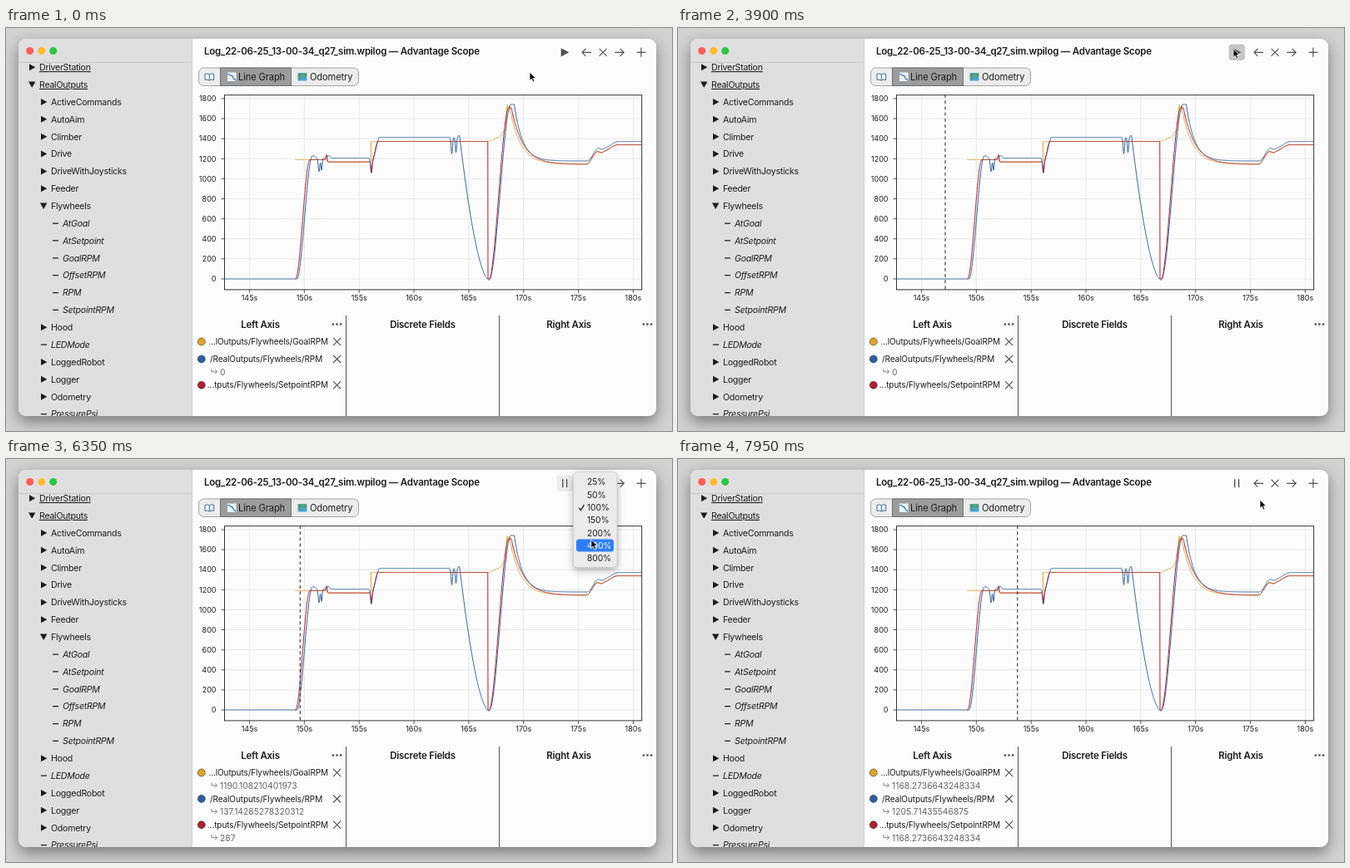
These frames come from a looping animation (800 by 485 pixels, 8000 ms). An HTML page:

```html
<!DOCTYPE html>
<html lang="en">
<head>
<meta charset="utf-8">
<title>Log viewer</title>
<style>
html, body { margin: 0; width: 100%; height: 100%; overflow: hidden; background: #d2d2d2; }
svg { display: block; width: 800px; height: 485px; }
text { font-family: Inter, sans-serif; letter-spacing: -.01em; white-space: pre; }
.tree text { letter-spacing: -.025em; }
.bold { font-weight: 600; letter-spacing: -.02em; }
.axis { letter-spacing: 0; }
.window { filter: drop-shadow(0 7px 9px rgba(0,0,0,.42)); }
.menu { filter: drop-shadow(0 3px 4px rgba(0,0,0,.3)); }
</style>
</head>
<body>
<script>
const NS = 'http://www.w3.org/2000/svg';
const INK = '#1c1c1c', ICON = '#505050', GOLD = '#dfa42c', BLUE = '#2f5f99', RED = '#a8232f';

function add(parent, tag, attrs = {}, content) {
  const el = document.createElementNS(NS, tag);
  for (const key in attrs) el.setAttribute(key, attrs[key]);
  if (content !== undefined) el.textContent = content;
  parent.append(el);
  return el;
}
const group = (parent, attrs) => add(parent, 'g', attrs);
const rect = (parent, x, y, width, height, fill, more) => add(parent, 'rect', { x, y, width, height, fill, ...more });
const path = (parent, d, stroke, more) => add(parent, 'path', { d, stroke, fill: 'none', ...more });
const shape = (parent, d, fill) => add(parent, 'path', { d, fill });
const dot = (parent, cx, cy, r, fill) => add(parent, 'circle', { cx, cy, r, fill });
// y is the visual middle of the line of text
const label = (parent, x, y, size, content, more) =>
  add(parent, 'text', { x, y: y + size * .363, 'font-size': size, fill: INK, ...more }, content);
const show = (el, on) => el.setAttribute('visibility', on ? 'visible' : 'hidden');
const place = (el, x, y) => el.setAttribute('transform', `translate(${x} ${y})`);

// Smooth 0..1 between two positions, and a soft spike around one
const ease = (x, from, to) => {
  const u = Math.min(1, Math.max(0, (x - from) / (to - from)));
  return u * u * (3 - 2 * u);
};
const bump = (x, centre, width) => Math.exp(-(((x - centre) / width) ** 2));

const svg = add(document.body, 'svg', { viewBox: '0 0 800 485', width: 800, height: 485 });
const defs = add(svg, 'defs');
const clip = (id, x, y, w, h, rx = 0) => rect(add(defs, 'clipPath', { id }), x, y, w, h, '#000', { rx });
clip('frame', 15, 13, 766, 454, 9);
clip('tree', 15, 41, 209, 426);
clip('plot', 262, 80, 502, 235);

rect(svg, 15, 13, 766, 454, '#fcfcfd', { rx: 9, class: 'window' });
const app = group(svg, { 'clip-path': 'url(#frame)' });

// Sidebar
rect(app, 15, 13, 209, 454, '#e0dfe0');
path(app, 'M223.5 13V467', '#d0d0d0');
path(app, 'M15 41.5H223', '#c9c9c9');
['#fe5f57', '#febc2e', '#28c840'].forEach((c, i) => dot(app, 28.7 + i * 14, 27.5, 4.5, c));

const tree = group(app, { 'clip-path': 'url(#tree)', class: 'tree' });
// + closed, v open, - field; the digit is the depth
const entries = ['+0DriverStation', 'v0RealOutputs', '+1ActiveCommands', '+1AutoAim', '+1Climber', '+1Drive',
  '+1DriveWithJoysticks', '+1Feeder', 'v1Flywheels', '-2AtGoal', '-2AtSetpoint', '-2GoalRPM', '-2OffsetRPM',
  '-2RPM', '-2SetpointRPM', '+1Hood', '-1LEDMode', '+1LoggedRobot', '+1Logger', '+1Odometry', '-1PressurePsi'];
const markers = { '+': 'M-12-4l7.3 4l-7.3 4z', 'v': 'M-13-3.6h8.4l-4.2 7.4z', '-': 'M-12-.6h7v1.3h-7z' };
entries.forEach(([kind, depth, ...name], i) => {
  const row = group(tree);
  place(row, 40 + depth * 14, 47.2 + i * 20.87);
  shape(row, markers[kind], INK);
  label(row, 0, 0, 10.6, name.join(''), {
    'font-style': kind === '-' ? 'italic' : 'normal',
    'text-decoration': depth === '0' ? 'underline' : 'none'
  });
});

// Title and tabs
label(app, 238, 27.7, 11.5, 'Log_22-06-25_13-00-34_q27_sim.wpilog — Advantage Scope', { class: 'bold' });
rect(app, 231.5, 48, 192, 21.5, '#ececec', { rx: 6, stroke: '#a3a3a3' });
rect(app, 257.5, 48, 85, 21.5, '#9c9c9c', { stroke: '#6f6f6f' });
label(app, 279, 59, 11.1, 'Line Graph');
label(app, 365, 59, 11.1, 'Odometry');
path(app, 'M239 55.5q3-1.5 5.3 .4q2.3-1.9 5.3-.4v7q-3-1.2-5.3 .6q-2.3-1.8-5.3-.6zM244.3 56v7', '#3d6f9c', { fill: '#f6f6f6' });
rect(app, 266, 53.5, 10.5, 10.5, '#edf3f9');
path(app, 'M266.5 55l3 2.2l2 .2l2.4 4l2.3 1.6', '#2878bd', { 'stroke-width': 1.3 });
rect(app, 350.5, 54, 11, 9.5, '#48a5cf', { rx: .8 });
shape(app, 'M351 55.5l4-.7l.8 2.2l-2 2.2l.3 3l-1.8-2.4zM357 55.5l4-.7v4l-2.6-.4z', '#5f9b45');

// Toolbar
const button = rect(app, 661.5, 19.5, 19.5, 19.5, '#e4e4e4', { rx: 4 });
const playIcon = shape(app, 'M666.7 24.2l9.6 5.1l-9.6 5.1z', ICON);
const pauseIcon = path(app, 'M668.7 24.3v10M673.6 24.3v10', ICON, { 'stroke-width': 1.4 });
const tools = ['M5.5 0h-11M-1-4.5l-4.5 4.5l4.5 4.5', 'M-4.4-4.4l8.8 8.8M4.4-4.4l-8.8 8.8',
  'M-5.5 0h11M1-4.5l4.5 4.5l-4.5 4.5', 'M-5.5 0h11M0-5.5v11'];
tools.forEach((d, i) => place(path(app, d, ICON, { 'stroke-width': 1.2 }), i < 3 ? 697.5 + i * 19.6 : 763, 29.3));

// Chart
const ZERO_Y = 302, PER_RPM = .12056, PER_SECOND = 13.17;
const yOf = v => ZERO_Y - v * PER_RPM;
const GRID = { 'stroke-width': .8 }, TICK = { 'stroke-width': .9 };
for (let v = 0; v <= 1800; v += 200) {
  path(app, `M262 ${yOf(v)}h502`, '#e4e4e4', GRID);
  path(app, `M258.5 ${yOf(v)}h4`, '#444', TICK);
  label(app, 252.5, yOf(v), 9, v, { 'text-anchor': 'end', class: 'axis' });
}
for (let s = 145; s <= 180; s += 5) {
  const x = 292.5 + (s - 145) * PER_SECOND;
  path(app, `M${x} 80v235`, '#e4e4e4', GRID);
  path(app, `M${x} 315v4`, '#444', TICK);
  label(app, x, 325, 9, s + 's', { 'text-anchor': 'middle', class: 'axis' });
}

// Signals in RPM, by horizontal position
const SHOT_1 = 1190.108210401973, SHOT_2 = 1168.2736643248334, SHOT_3 = 1373, IDLE = 1205.7;
const LOG_START = 347.5, SHOT_2_X = 386, SHOT_3_X = 438.4, STOP_X = 579, SPIN_UP_X = 580;

// Decay from a peak to a steady speed, followed by a late climb in two stages
const settle = (x, peakX, peak, decay) => peak - 564 * (1 - Math.exp(-Math.max(0, x - peakX) / decay))
  + 128 * ease(x, 697, 711) - 12 * bump(x, 715, 3) + 66 * ease(x, 716, 735);

function goal(x) {
  if (x < SHOT_2_X) return SHOT_1;
  if (x < SHOT_3_X) return SHOT_2;
  if (x < STOP_X) return SHOT_3;
  if (x < 601) return SHOT_3 + 40 * ease(x, 579, 592) + 80 * ease(x, 592, 600);
  return settle(x, 605, 1709, 13) + 35 * Math.sin(x * 2.6) * Math.exp((601 - x) / 6);
}

function setpoint(x) {
  if (x < SHOT_2_X) return SHOT_1 * ease(x, 347.75, 365) + 50 * bump(x, 385, 1);
  if (x < STOP_X) return SHOT_2 + 50 * bump(x, 385, 1) - 100 * bump(x, 439, 1)
    + (SHOT_3 - SHOT_2) * ease(x, 439.5, 447);
  return settle(x, 607, 1709, 14) * ease(x, SPIN_UP_X, 604);
}

function rpm(x) {
  if (x < 545) return 1228 * ease(x, 349.4, 368) - (1228 - IDLE) * ease(x, 370, 374)
    - 135 * bump(x, 376, 1.3) - 120 * bump(x, 379, 1) + 28 * bump(x, 387.5, 2)
    - 150 * bump(x, 438.8, 1.3) + (1414 - IDLE) * ease(x, 440, 449)
    - 165 * bump(x, 535.5, 1.2) - 150 * bump(x, 540.5, 1.1) + 20 * bump(x, 544, 1.2);
  if (x < SPIN_UP_X) return 1426 * ((SPIN_UP_X - x) / 35) ** 1.72 - 8;
  return (settle(x - 1, 609.5, 1742, 10) + 8) * ease(x, 580.5, 606.5) - 8;
}

const plot = group(app, { 'clip-path': 'url(#plot)' });
function trace(signal, color, from) {
  const points = [];
  for (let x = from; x <= 764; x += .25) points.push(`${x} ${yOf(signal(x)).toFixed(2)}`);
  path(plot, 'M' + points.join('L'), color, { 'stroke-linejoin': 'round' });
}
trace(goal, GOLD, LOG_START);
trace(rpm, BLUE, 262);
trace(setpoint, RED, LOG_START);

const marker = color => path(plot, 'M0 80v235', color, { 'stroke-dasharray': '4 3.2' });
const hoverLine = marker('#b4b4b4'), timeLine = marker('#222');
rect(app, 262.5, 80.7, 501.2, 234.2, 'none', { stroke: '#333' });

// Legend
path(app, 'M408.5 346V467M592.5 346V467', '#555');
[[305.5, 'Left Axis'], [500.5, 'Discrete Fields'], [676, 'Right Axis']].forEach(([x, name]) =>
  label(app, x, 356.7, 11.5, name, { 'text-anchor': 'middle', class: 'bold' }));
[397.5, 770.5].forEach(x => [-4.6, 0, 4.6].forEach(d => dot(app, x + d, 356.5, 1.3, '#444')));

const fields = [[GOLD, '...lOutputs/Flywheels/GoalRPM'], [BLUE, '/RealOutputs/Flywheels/RPM'],
  [RED, '...tputs/Flywheels/SetpointRPM']];
const rows = fields.map(([color, name]) => {
  const row = group(app), clipped = name.startsWith('.');
  add(row, 'circle', { cx: 234.8, cy: 0, r: 4.5, fill: color, stroke: '#333', 'stroke-width': .6 });
  label(row, clipped ? 387 : 245, 0, 10, name, { 'text-anchor': clipped ? 'end' : 'start' });
  path(row, 'M393-4.6l9.2 9.2M402.2-4.6l-9.2 9.2', ICON, { 'stroke-width': 1.2 });
  const reading = group(row);
  path(reading, 'M247 11.8v3.6h6.5M251 12.8l2.6 2.6l-2.6 2.6', '#777', { 'stroke-width': .9 });
  return { row, reading, value: label(reading, 257, 15.6, 10.3, '', { fill: '#666', class: 'axis' }) };
});

function updateLegend(values) {
  let y = 377.5;
  rows.forEach(({ row, reading, value }, i) => {
    const known = values[i] !== null;
    place(row, 0, y);
    show(reading, known);
    value.textContent = known ? values[i] : '';
    y += known ? 31.4 : 20.9;
  });
}

// Speed menu
const ITEM = 15.3, FIRST_ITEM = 27.7;
const menu = group(svg, { class: 'menu' });
rect(menu, 681.5, 15.5, 52.5, 115, '#ebebec', { rx: 5, stroke: '#c4c4c4', 'stroke-width': .6 });
const highlight = rect(menu, 685, 0, 45, 15, '#2f7ef7', { rx: 3.5 });
const items = ['25%', '50%', '100%', '150%', '200%', '400%', '800%'].map((name, i) =>
  label(menu, 698, FIRST_ITEM + i * ITEM, 10.3, name));
path(menu, 'M688.3 58.8l2.2 2.9l3.9-6.6', INK, { 'stroke-width': 1.3 });

const cursor = path(svg, 'M0 0V10.4L2.4 8.2L4.1 12L6 11.2L4.3 7.5H7.5Z', '#fff', { fill: '#000', 'stroke-width': .9 });

// Timeline, ms
const LOOP = 8000, STEP = 50;
const SELECT = 2450, PRESS = 3850, PLAY = 3900, MENU_OPEN = 5900, PICK = 6950, FASTER = 7103;
const SELECT_X = 321;
const moves = [
  { from: 700, to: 1900, x: 321, y: 200.5 },
  { from: 2850, to: 3400, x: 667, y: 25 },
  { from: 5650, to: 6300, x: 702.8, y: 97 },
  { from: 7450, to: 7900, x: 699, y: 49 }
];

const pointer = t => moves.reduce(([x, y], move) => {
  const u = ease(t, move.from, move.to);
  return [x + (move.x - x) * u, y + (move.y - y) * u];
}, [629, 53]);

function playhead(t) {
  const seconds = (Math.max(0, t - PLAY) + 3 * Math.max(0, t - FASTER)) / 1000;
  return SELECT_X + seconds * PER_SECOND;
}

const snap = v => [SHOT_1, SHOT_2].find(shot => Math.abs(shot - v) < 1.5) ?? Math.round(v);
const ENCODER_STEP = Math.fround(20 / 7);

function readings(x) {
  const active = x >= LOG_START;
  const speed = Math.fround(Math.round(rpm(x) / ENCODER_STEP) * ENCODER_STEP);
  return [active ? snap(goal(x)) : null, speed, active ? snap(setpoint(x)) : null];
}

function draw(t) {
  const [x, y] = pointer(t), head = playhead(t);
  const selected = t >= SELECT, playing = t > PLAY, menuOpen = t >= MENU_OPEN && t < FASTER;
  place(cursor, x, y);

  show(playIcon, !playing);
  show(pauseIcon, playing);
  show(button, menuOpen || (x > 661 && x < 681 && y > 19 && y < 39));
  button.setAttribute('fill', t >= PRESS && !playing ? '#c6c6c6' : menuOpen ? '#eee' : '#e4e4e4');

  show(timeLine, selected);
  place(timeLine, head, 0);
  show(hoverLine, !menuOpen && x > 262 && x < 764 && y > 80 && y < 315 && !(selected && Math.abs(x - head) < 1));
  place(hoverLine, x, 0);
  updateLegend(selected ? readings(head) : [null, 0, null]);

  show(menu, menuOpen);
  const blink = t >= PICK && t < PICK + 50;
  const index = menuOpen && x > 685 && !blink ? Math.round((y + .6 - FIRST_ITEM) / ITEM) : -1;
  highlight.setAttribute('y', FIRST_ITEM - 7.6 + index * ITEM);
  highlight.setAttribute('opacity', index < 0 ? 0 : 1);
  items.forEach((item, i) => item.setAttribute('fill', i === index ? '#fff' : INK));
}

const origin = performance.now();
function tick(now) {
  const t = Math.max(0, now - origin) % LOOP;
  draw(Math.floor(t / STEP) * STEP);
  requestAnimationFrame(tick);
}
draw(0);
requestAnimationFrame(tick);
</script>
</body>
</html>
```
